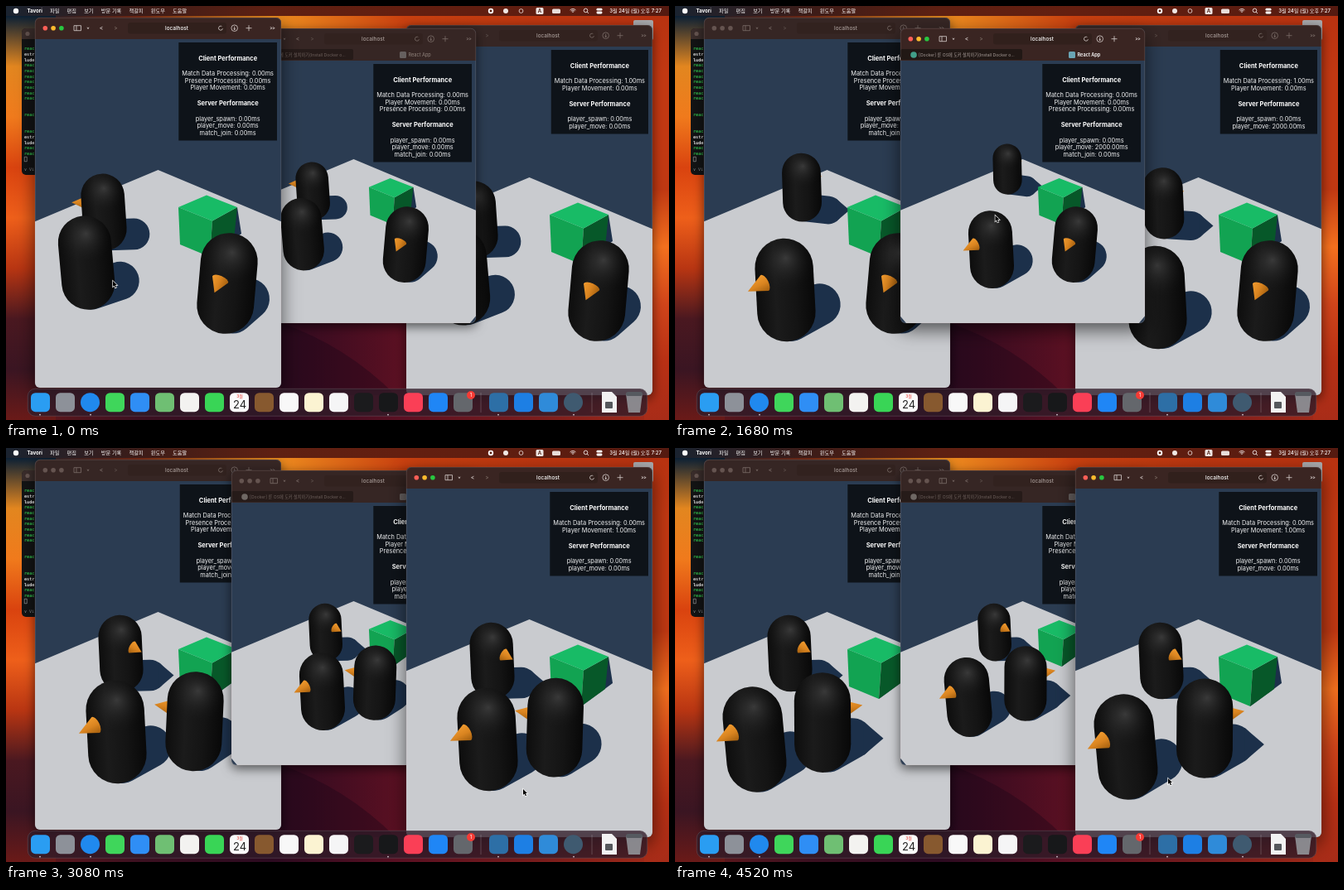
These frames come from a looping animation (800 px wide and 500 px high, 4.56 s). An HTML page with a canvas:

```html
<!DOCTYPE html>
<html lang="ko">
<head>
<meta charset="utf-8">
<title>Desktop</title>
<style>
html, body { margin: 0; width: 800px; height: 500px; overflow: hidden; background: #1a1020; }
canvas { display: block; width: 800px; height: 500px; }
</style>
</head>
<body>
<canvas id="stage" width="800" height="500"></canvas>
<script>
const c = document.getElementById('stage').getContext('2d');
const LOOP = 4560, STEP = 40, SPEED = 0.156;
const SANS = 'Inter, "Noto Sans CJK KR", "Noto Sans CJK", sans-serif';
const MONO = '"DejaVu Sans Mono", monospace';

// ---------- helpers ----------
const mix = (a, b, k) => a + (b - a) * k;
const pick = (steps, t) => steps.filter(s => t >= s[0]).pop()[1];
const toggled = (times, t) => times.filter(s => t >= s).length % 2;

function text(s, x, y, size, color, align = 'center', weight = 400, family = SANS) {
  c.font = `${weight} ${size}px ${family}`;
  c.textAlign = align;
  c.textBaseline = 'middle';
  c.fillStyle = color;
  c.fillText(s, x, y);
  return c.measureText(s).width;
}
function box(x, y, w, h, r, color) {
  c.beginPath();
  c.roundRect(x, y, w, h, r);
  c.fillStyle = color;
  c.fill();
}
function dot(x, y, r, color) {
  c.beginPath();
  c.arc(x, y, r, 0, 7);
  c.fillStyle = color;
  c.fill();
}
function poly(pts, color) {
  c.beginPath();
  pts.forEach(p => c.lineTo(p[0], p[1]));
  c.closePath();
  c.fillStyle = color;
  c.fill();
}
function line(color, ...pts) {
  c.strokeStyle = color;
  c.lineWidth = 0.8;
  c.beginPath();
  pts.forEach(p => c.lineTo(p[0], p[1]));
  c.stroke();
}
// chevron pointing along (dx, dy)
function chevron(x, y, dx, dy, color) {
  line(color, [x - dx - dy, y - dy - dx], [x + dx, y + dy], [x - dx + dy, y - dy + dx]);
}
function ring(x, y, r, color, from = 0, to = 7) {
  c.beginPath();
  c.arc(x, y, r, from, to);
  c.strokeStyle = color;
  c.lineWidth = 0.8;
  c.stroke();
}
function frame(x, y, w, h, r, color) {
  c.beginPath();
  c.roundRect(x + 0.25, y + 0.25, w - 0.5, h - 0.5, r);
  c.strokeStyle = color;
  c.lineWidth = 0.5;
  c.stroke();
}
// gradient with evenly spaced colours
function fade(x0, y0, x1, y1, ...colors) {
  const g = c.createLinearGradient(x0, y0, x1, y1);
  colors.forEach((col, i) => g.addColorStop(i / (colors.length - 1), col));
  return g;
}

// ---------- players: constant speed through a few points, facing where they go ----------
const players = [
  { start: -85, yaw: -2.7, lag: [0, 60, 60], path: [[103, 322], [97, 310], [142, 335], [133, 343]] },
  { start: 1335, yaw: -1.8, lag: [50, 0, 150], path: [[118, 249], [172, 203], [127, 231], [138.5, 248]] },
  { start: 2740, yaw: -0.3, lag: [85, 20, 0], path: [[267, 335], [192, 326], [268, 314], [168, 333], [230, 324]] }
];
function walk({ path, start, yaw }, t) {
  let left = (t - start) * SPEED, [x, y] = path[0], minX = x;
  for (let i = 1; i < path.length && left > 0; i++) {
    const [px, py] = path[i - 1], dx = path[i][0] - px, dy = path[i][1] - py;
    const len = Math.hypot(dx, dy), k = Math.min(1, left / len);
    x = px + dx * k;
    y = py + dy * k;
    minX = Math.min(minX, x);
    yaw = Math.atan2(dx, dy - Math.abs(dx) / 4);
    left -= len;
  }
  return { x, y, minX, yaw };
}
function poses(t, id) {
  const list = players.map(p => walk(p, t - p.lag[id]));
  // the third player shoves the first one aside
  const push = Math.max(0, list[0].x - (list[2].minX - 72));
  list[0].x -= push;
  list[0].y += push * push * 0.0066;
  for (const p of list) p.w = 47 + (p.y - 220) * 0.19;
  return list.sort((a, b) => a.y - b.y);
}

const SHADE = '#1c304a';
function shadow({ x, y, w, yaw }) {
  const far = 343 - y;
  const ex = x + w * (0.6 + far * 0.001 - Math.max(0, x - 125) * 0.0016), ey = y + w * (0.25 + far * 0.0027);
  c.strokeStyle = SHADE;
  c.lineCap = 'round';
  c.lineWidth = w * 0.72;
  c.beginPath();
  c.moveTo(x + w * 0.1, y + w * 0.52);
  c.lineTo(ex, ey);
  c.stroke();
  c.lineCap = 'butt';
  if (yaw > 0.5) poly([[ex + w * 0.2, ey - w * 0.3], [ex + w * 0.55, ey], [ex + w * 0.2, ey + w * 0.3]], SHADE);
}
function beak({ y, w, yaw }) {
  const s = Math.sin(yaw), k = Math.cos(yaw) * (y / 335) ** 2;
  const bx = 0.42 * w * s, by = w * (0.14 * k - 0.2);
  const dx = 0.34 * w * s, dy = w * (0.22 * k + 0.02), r = 0.15 * w;
  const rim = s < 0 ? ['#a5600f', '#f09a2e'] : ['#f09a2e', '#a5600f'];
  c.save();
  c.translate(bx, by);
  c.rotate(Math.atan2(dy, dx));
  c.beginPath();
  c.ellipse(0, 0, r * 0.45, r, 0, Math.PI / 2, Math.PI * 1.5);
  c.lineTo(Math.hypot(dx, dy), 0);
  c.closePath();
  c.fillStyle = fade(0, -r, 0, r, rim[0], '#d98420', rim[1]);
  c.fill();
  c.restore();
}
function body(p) {
  const { x, y, w } = p, h = w * 1.77, behind = Math.abs(p.yaw) > 1.5;
  c.save();
  c.translate(x, y);
  if (behind) beak(p);
  c.save();
  c.rotate((x - 183.5) * 0.00104);
  box(-w / 2, -h / 2, w, h, w / 2, fade(-w / 2, 0, w / 2, 0, '#0d0d0d', '#1b1b1b', '#141414', '#080808'));
  const g = c.createRadialGradient(w * 0.04, -h * 0.31, 0, 0, -h * 0.26, w * 0.5);
  g.addColorStop(0, 'rgba(66,66,66,.8)');
  g.addColorStop(1, 'rgba(20,20,20,0)');
  box(-w / 2, -h / 2, w, h, w / 2, g);
  c.restore();
  if (!behind) beak(p);
  c.restore();
}
function scene(t, id) {
  poly([[183.5, 198], [-120, 325], [-12.5, 450], [2, 467], [365, 467], [379, 450], [487, 325]], '#c9cbcf');
  const list = poses(t, id);
  const top = [242, 228.5], left = [208, 243], front = [249, 259.5], right = [279, 243];
  const foot = [246, 303], lowLeft = [210, 288], lowRight = [275, 282];
  poly([foot, [284, 275], right], SHADE);
  list.forEach(shadow);
  poly([left, front, foot, lowLeft], '#12a352');
  poly([front, right, lowRight, foot], '#075829');
  poly([top, right, front, left], '#18bb66');
  list.forEach(body);
}

// ---------- windows ----------
const MATCH = 'Match Data Processing', PRESENCE = 'Presence Processing', MOVE = 'Player Movement';
const wins = [
  { x: 35, y: 14, w: 297, h: 447, bar: 26, rows: [MATCH, PRESENCE, MOVE], slow: { [MATCH]: [2960, 3400] }, join: true },
  { x: 272, y: 27, w: 295, h: 356, bar: 39, rows: [MATCH, MOVE, PRESENCE], slow: {}, join: true, tabs: true },
  { x: 483, y: 23, w: 297, h: 447, bar: 26, rows: [MATCH, MOVE],
    slow: { [MATCH]: [0, 320, 1260, 1700], [MOVE]: [320, 1260, 2500] } }
];
const serverMs = [[0, 0], [320, 2000], [1800, 1000], [2500, 0], [3400, 1000], [4200, 0]];

function panel(win, t) {
  const row = (name, v) => `${name}: ${v.toFixed(2)}ms`;
  const client = win.rows.map(r => row(r, toggled(win.slow[r] || [], t)));
  const server = [row('player_spawn', 0), row('player_move', pick(serverMs, t))];
  if (win.join) server.push(row('match_join', 0));
  c.font = `400 7.36px ${SANS}`;
  const width = Math.max(...client.map(s => c.measureText(s).width)) + 8;
  const right = win.x + win.w - 5, top = win.y + win.bar + 4, mid = right - width / 2;
  box(right - width, top, width, 67 + 8.6 * (client.length + server.length), 0, '#0e1319');
  let y = top + 19.5;
  for (const [title, rows] of [['Client Performance', client], ['Server Performance', server]]) {
    text(title, mid, y, 7.5, '#fff', 'center', 700);
    y += 10;
    for (const s of rows) text(s, mid, y += 8.55, 7.36, '#f2f3f4');
    y += 18.8;
  }
}
function toolbar(win, active) {
  const { x, y } = win, m = y + 12.7;
  const ink = active ? '#d9d0cd' : '#7c6e69', faint = active ? '#77675f' : '#5a4c48';
  box(x, y, win.w, win.bar, 0, active ? '#3a2522' : '#362624');
  ['#ff5f57', '#febc2e', '#28c840'].forEach((col, i) => dot(x + 12.3 + i * 9.8, m, 2.8, active ? col : '#655450'));
  line(ink, [x + 47, m - 3], [x + 55.5, m - 3], [x + 55.5, m + 3], [x + 47, m + 3], [x + 47, m - 3]);
  line(ink, [x + 50, m - 3], [x + 50, m + 3]);
  chevron(x + 64, m, 0, 1, ink);
  chevron(x + 80, m, -1.5, 0, ink);
  chevron(x + 97.5, m, 1.5, 0, faint);
  box(x + 112, y + 6, 119, 13.5, 3, active ? '#31201c' : '#32221f');
  text('localhost', x + 171, m + 0.3, 6.4, active ? '#fff' : '#a89c98', 'center', 500);
  ring(x + 224, m, 2.5, ink, 0.2, 5.3);
  ring(x + 240.7, m, 3.8, ink);
  line(ink, [x + 240.7, m - 2], [x + 240.7, m + 2]);
  chevron(x + 240.7, m + 1.2, 0, 0.8, ink);
  line(ink, [x + 254.5, m], [x + 261.5, m]);
  line(ink, [x + 258, m - 3.5], [x + 258, m + 3.5]);
  chevron(x + 285, m, 1.2, 0, ink);
  chevron(x + 288, m, 1.2, 0, ink);
  if (!win.tabs) return;
  const ty = y + 32;
  box(x, y + 25, 147, 13, 2, active ? '#211815' : '#261b19');
  dot(x + 16, ty, 3.8, active ? '#41a08a' : '#6f6864');
  text('[Docker] 룬 OS에 도커 설치하기(Install Docker o...', x + 22, ty, 5.15, active ? '#a79c98' : '#6d605c', 'left');
  box(x + 203, ty - 4, 8, 8, 1.5, active ? '#6aa5b5' : '#66605f');
  text('React App', x + 213.5, ty, 5.6, active ? '#fff' : '#93867f', 'left', active ? 600 : 400);
}
function drawWindow(id, active, t) {
  const win = wins[id], { x, y, w, h, bar } = win, k = (h - bar) / 421;
  c.save();
  c.shadowColor = 'rgba(0,0,0,.6)';
  c.shadowBlur = active ? 22 : 13;
  c.shadowOffsetY = active ? 8 : 4;
  box(x, y, w, h, 6, '#2b3c52');
  c.restore();
  c.save();
  c.beginPath();
  c.roundRect(x, y, w, h, 6);
  c.clip();
  c.save();
  c.translate(x + w / 2, y + bar);
  c.scale(k, k);
  c.translate(-183.5, -40);
  scene(t, id);
  c.restore();
  toolbar(win, active);
  panel(win, t);
  c.restore();
  frame(x, y, w, h, 6, 'rgba(210,190,185,.35)');
}

// ---------- desktop ----------
function wallpaper() {
  box(0, 0, 800, 500, 0, fade(0, 0, 800, 0, '#6a1a1a', '#3c1020', '#2c0a20', '#5c1022', '#7a1c1c', '#a82c18'));
  box(0, 0, 800, 30, 0, fade(0, 0, 800, 0, '#0c2034', '#7a2a14', '#f0901f', '#c9400f', '#bd3610', '#b83210'));
  box(0, 12, 60, 488, 0, fade(0, 12, 0, 500, '#0c2034', '#e2861f', '#f07a1c', '#d9430f', '#ee5f1a', '#b83512', '#4a1820', '#3a1522', '#6a1a18'));
  box(770, 12, 30, 488, 0, fade(0, 12, 0, 500, '#b83210', '#c23812', '#c23812', '#c03812', '#f4701e', '#d0441a', '#b83014', '#a82c18'));
  c.beginPath();
  c.moveTo(332, 383);
  c.quadraticCurveTo(410, 410, 470, 470);
  c.lineTo(332, 470);
  c.fillStyle = 'rgba(28,6,24,.4)';
  c.fill();
  box(757, 17, 24, 24, 2, '#a9aaad');
}
function terminal() {
  box(19, 27, 300, 177, 5, '#121314');
  box(19, 27, 300, 13, [5, 5, 0, 0], '#392c2a');
  dot(26, 33.5, 2.6, '#655450');
  const words = { r: ['reac', '#2fb84a'], e: ['estr', '#d8d8d8'], l: ['lude', '#f0f0f0'] };
  [...'relrrrrrrr  r  relrr'].forEach((key, i) => {
    if (words[key]) text(words[key][0], 22, 52 + i * 6.66, 5.2, words[key][1], 'left', 700, MONO);
  });
  frame(22, 182, 3.5, 6, 0, '#ccc');
  text('∨ Vi', 22, 198, 5, '#8a8d90', 'left', 400, MONO);
}
function menubar() {
  box(0, 0, 800, 12, 0, fade(0, 0, 800, 0, '#1a2330', '#3c1c18', '#5e2012', '#641f10', '#5e1d10', '#551a10'));
  dot(12, 6, 3.2, '#fff');
  text('Tavori', 25.5, 6, 6.1, '#fff', 'left', 700);
  let x = 53;
  for (const s of ['파일', '편집', '보기', '방문 기록', '책갈피', '윈도우', '도움말']) {
    x += text(s, x, 5.8, 6.2, '#fff', 'left') + 9.2;
  }
  dot(585, 6, 3.2, '#fff');
  dot(585, 6, 1.4, '#5a2212');
  dot(603, 6, 3, '#f0e8e5');
  ring(621.5, 6, 2.4, '#f0e8e5');
  box(639.5, 2, 9, 8, 1.5, '#eee6e3');
  text('A', 644, 6.2, 6, '#4d2017', 'center', 600);
  box(659, 3.5, 10, 5.5, 1.5, '#e8dedb');
  for (const r of [1.5, 3.2, 4.9]) ring(684, 8.4, r, '#fff', -2.35, -0.8);
  ring(699.5, 5.4, 2.3, '#fff');
  line('#fff', [701.2, 7.1], [703, 9]);
  for (const y of [2.8, 6.6]) box(712.5, y, 7, 2.8, 1.4, '#fff');
  text('3월 24일 (월) 오후 7:27', 791, 6, 6.1, '#fff', 'right', 500);
}
const apps = '#2a9df2 #8d9199 #2089ee #3fd65b #2f8ef5 #6fbf73 #f3f2f0 #39d556 #fafafa #87592f #f8f8f8 #fbf3d2 #f5f5f6 #1b1b1d #17181a #fa3f56 #1f86f6 #64676c #2d6fa6 #1d7fe4 #2f8bd9 #3f5a70'.split(' ');
function dock() {
  box(26, 462, 748, 33.5, 9, 'rgba(48,28,40,.78)');
  frame(26, 462, 748, 33.5, 9, 'rgba(255,255,255,.25)');
  apps.forEach((col, i) => {
    const x = 41.5 + i * 30 + (i > 17 ? 13 : 0), round = i === 2 || i === 21;
    box(x - 11.5, 467.2, 23, 23, round ? 11.5 : 5.5, col);
  });
  text('3월', 282, 471.5, 5, '#e8423c', 'center', 500);
  text('24', 282, 481.8, 13, '#222');
  dot(561, 470, 5, '#f53b35');
  text('1', 561, 470.3, 6, '#fff');
  for (const x of [573, 707]) line('rgba(255,255,255,.25)', [x, 467], [x, 491]);
  poly([[719, 466], [731, 466], [737, 472], [737, 491], [719, 491]], '#f2f2f2');
  box(723, 478, 9, 8, 1, '#55585c');
  poly([[748, 468], [768, 468], [765, 491], [751, 491]], 'rgba(150,155,160,.85)');
  box(748, 466, 20, 5, 2.5, '#565a60');
  for (const x of [41, 102, 461, 594, 685]) dot(x, 493.6, 0.9, '#d6ccd4');
}

// rests at each spot from arrival to departure: [arrive, leave, x, y]
const stops = [[0, 60, 129, 332], [320, 800, 137, 391], [1140, 1400, 410, 247], [2040, 2220, 352, 262],
  [2740, 3100, 624, 412], [3800, 3900, 615, 372], [4480, LOOP, 595, 399]];
function cursor(t) {
  const i = stops.findLastIndex(s => t >= s[0]);
  const a = stops[i], b = stops[i + 1] || a;
  const k = t <= a[1] ? 0 : (t - a[1]) / (b[0] - a[1]), e = k * k * (3 - 2 * k);
  c.save();
  c.translate(mix(a[2], b[2], e), mix(a[3], b[3], e));
  c.beginPath();
  for (const [px, py] of [[0, 0], [0, 7], [1.6, 5.5], [2.8, 8.3], [4, 7.8], [2.9, 5], [5, 5]]) c.lineTo(px, py);
  c.closePath();
  c.lineWidth = 1.3;
  c.strokeStyle = '#fff';
  c.stroke();
  c.fillStyle = '#000';
  c.fill();
  c.restore();
}

const order = [[0, [2, 1, 0]], [1180, [2, 0, 1]], [2480, [0, 1, 2]]];
function draw(t) {
  wallpaper();
  terminal();
  pick(order, t).forEach((id, i) => drawWindow(id, i === 2, t));
  menubar();
  dock();
  cursor(t);
}
let start;
function tick(now) {
  start ??= now;
  draw(Math.floor(((now - start) % LOOP) / STEP) * STEP);
  requestAnimationFrame(tick);
}
draw(0);
requestAnimationFrame(tick);
</script>
</body>
</html>
```
